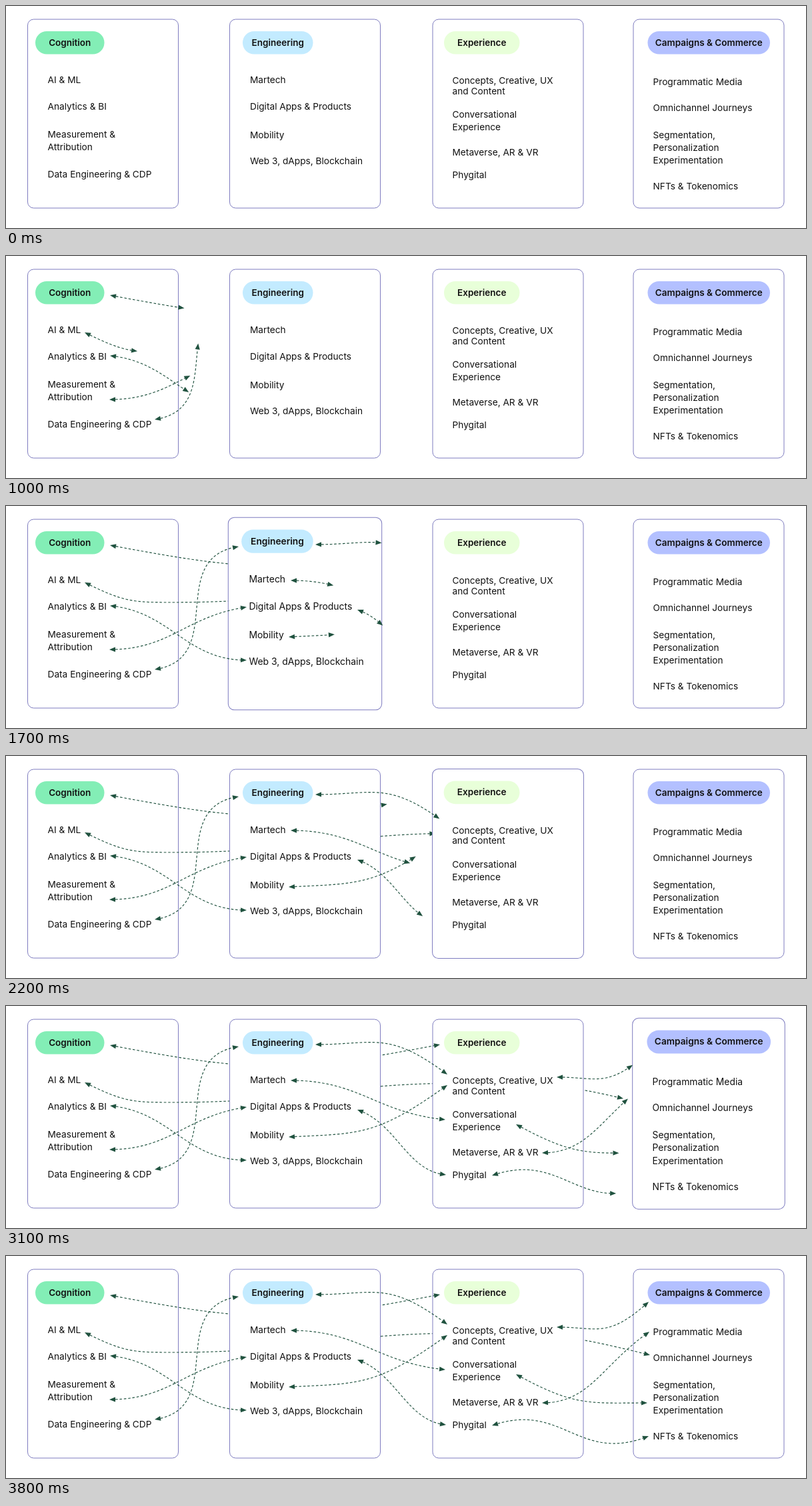
An HTML page with a canvas for the animation above (8000 ms loop, 1200 by 334 pixels).

```html
<!DOCTYPE html>
<html lang="en">
<head>
<meta charset="utf-8">
<title>Connected capabilities</title>
<style>
  html, body { margin: 0; width: 100%; height: 100%; overflow: hidden; background: #fff; }
  canvas { display: block; width: 1200px; height: 334px; }
</style>
</head>
<body>
<canvas id="stage"></canvas>
<script>
const W = 1200, H = 334, LOOP = 8000, STEP = 100;
const CARD = { y: 20, w: 226, h: 284, r: 9 };
const SWELL = 0.056, SWELL_TIME = 400, LINE_GAP = 19.3;
const GREEN = '#20523f', BORDER = '#7f7dc0', INK = '#111';
const FONT = 'Inter, "Open Sans", sans-serif';
const canvas = document.getElementById('stage');
const ctx = canvas.getContext('2d');
const ratio = window.devicePixelRatio || 1;
canvas.width = W * ratio;
canvas.height = H * ratio;

const clamp = (v, lo, hi) => Math.max(lo, Math.min(hi, v));
const mix = (a, b, u) => a + (b - a) * u;
const ease = u => (1 - Math.cos(Math.PI * clamp(u, 0, 1))) / 2;

// Each row: baseline, then one or more lines of text
const cards = [
  {
    x: 32.5, textX: 62.5, peak: 500,
    title: 'Cognition', pillX: 44, pillW: 103.5, color: '#83eeb6',
    rows: [[116, 'AI & ML'], [156, 'Analytics & BI'], [198, 'Measurement &', 'Attribution'],
           [257.5, 'Data Engineering & CDP']]
  },
  {
    x: 335.5, textX: 366, peak: 1460,
    title: 'Engineering', pillX: 355, pillW: 105.5, color: '#c3ebff',
    rows: [[116, 'Martech'], [156, 'Digital Apps & Products'], [198.5, 'Mobility'],
           [237.5, 'Web 3, dApps, Blockchain']]
  },
  {
    x: 640, textX: 669.5, peak: 2530,
    title: 'Experience', pillX: 657, pillW: 113.5, color: '#e8ffd9',
    rows: [[117, 'Concepts, Creative, UX'], [132.5, 'and Content'],
           [167.5, 'Conversational', 'Experience'], [225, 'Metaverse, AR & VR'], [258.5, 'Phygital']]
  },
  {
    x: 941, textX: 970.5, peak: 3380,
    title: 'Campaigns & Commerce', pillX: 962.5, pillW: 183.5, color: '#b3c0ff',
    rows: [[119, 'Programmatic Media'], [158, 'Omnichannel Journeys'],
           [198.5, 'Segmentation,', 'Personalization', 'Experimentation'], [275.5, 'NFTs & Tokenomics']]
  }
];

// Polyline with running length through knots [x, y, slope]
function curve(knots) {
  const out = [[knots[0][0], knots[0][1], 0]];
  for (let i = 1; i < knots.length; i++) {
    const [x0, y0, m0] = knots[i - 1], [x1, y1, m1] = knots[i];
    // Steep spans get longer handles
    const k = Math.max(0.45 * (x1 - x0), 0.6 * Math.abs(y1 - y0));
    const bezier = (a, b, c, d, u) => {
      const v = 1 - u;
      return a * v * v * v + 3 * b * u * v * v + 3 * c * u * u * v + d * u * u * u;
    };
    for (let s = 1; s <= 80; s++) {
      const x = bezier(x0, x0 + k, x1 - k, x1, s / 80);
      const y = bezier(y0, y0 + m0 * k, y1 - m1 * k, y1, s / 80);
      const last = out[out.length - 1];
      out.push([x, y, last[2] + Math.hypot(x - last[0], y - last[1])]);
    }
  }
  return out;
}

function pointAt(line, len) {
  let i = 1;
  while (i < line.length - 1 && line[i][2] < len) i++;
  const a = line[i - 1], b = line[i], u = (len - a[2]) / (b[2] - a[2]);
  return [mix(a[0], b[0], u), mix(a[1], b[1], u)];
}

const link = (start, time, ...knots) => ({ start, time, line: curve(knots) });
const wave = (start, time, ...spans) => spans.map(knots => link(start, time, ...knots));

const cognitionLink = link(100, 2850, [156, 59, 0.19], [651, 58, -0.19]);
const aiLink = link(350, 3200, [118, 115, 0.5], [250, 145, 0], [690, 116, 0], [966, 149, 0.25]);
const links = [
  ...wave(240, 1365,
    [[156, 150, 0.1], [361, 232, 0]],
    [[155, 216, 0], [361, 152, -0.15]],
    [[223, 246, -0.15], [349, 61, -0.15]]),
  link(1004, 1440, [464, 58, 0], [662, 103, 0.75]),
  ...wave(1190, 1470,
    [[427, 112, 0], [659, 171, 0.1]],
    [[424, 197, -0.05], [662, 119, -0.72]],
    [[527, 156, 0.35], [660, 254, 0.1]]),
  ...wave(2100, 1430,
    [[826, 107, 0], [964, 69, -0.9]],
    [[765, 178, 0.55], [962, 221, 0]],
    [[804, 221, 0], [965, 114, -0.7]],
    [[729, 255, -0.35], [964, 271, -0.4]])
];

function head(tip, back, size) {
  ctx.save();
  ctx.translate(...tip);
  ctx.rotate(Math.atan2(tip[1] - back[1], tip[0] - back[0]));
  ctx.beginPath();
  ctx.moveTo(0, 0);
  ctx.lineTo(-size, -size * 0.4);
  ctx.lineTo(-size, size * 0.4);
  ctx.fill();
  ctx.restore();
}

function drawLink({ start, time, line }, t) {
  const len = ease((t - start) / time) * line[line.length - 1][2];
  if (len < 4) return;
  const size = Math.min(9, len * 0.4);
  const from = pointAt(line, size), to = pointAt(line, len - size);
  ctx.strokeStyle = ctx.fillStyle = GREEN;
  ctx.lineWidth = 1.15;
  ctx.setLineDash([3.6, 2.8]);
  ctx.beginPath();
  ctx.moveTo(...from);
  for (const [x, y, d] of line) if (d > size && d < len - size) ctx.lineTo(x, y);
  ctx.lineTo(...to);
  ctx.stroke();
  ctx.setLineDash([]);
  head(pointAt(line, 0), from, size);
  head(pointAt(line, len), to, size);
}

function box(x, y, w, h, r, fill) {
  ctx.beginPath();
  ctx.roundRect(x, y, w, h, r);
  ctx.fillStyle = fill;
  ctx.fill();
}

function drawCard(card, t) {
  const phase = clamp((t - card.peak) / SWELL_TIME, -1, 1);
  const scale = 1 + SWELL * Math.cos(phase * Math.PI / 2) ** 2;
  const cx = card.x + CARD.w / 2, cy = CARD.y + CARD.h / 2;
  ctx.save();
  ctx.translate(cx, cy);
  ctx.scale(scale, scale);
  ctx.translate(-cx, -cy);

  box(card.x, CARD.y, CARD.w, CARD.h, CARD.r, '#fff');
  ctx.strokeStyle = BORDER;
  ctx.lineWidth = 1;
  ctx.stroke();
  box(card.pillX, 38, card.pillW, 34.5, 17.2, card.color);

  ctx.fillStyle = INK;
  ctx.textAlign = 'center';
  ctx.font = '600 13.5px ' + FONT;
  ctx.fillText(card.title, card.pillX + card.pillW / 2, 59.5);
  ctx.textAlign = 'left';
  ctx.font = '400 13.7px ' + FONT;
  for (const [y, ...lines] of card.rows) {
    lines.forEach((text, i) => ctx.fillText(text, card.textX, y + i * LINE_GAP));
  }
  ctx.restore();
}

function draw(t) {
  ctx.setTransform(ratio, 0, 0, ratio, 0, 0);
  ctx.fillStyle = '#fff';
  ctx.fillRect(0, 0, W, H);
  drawCard(cards[0], t);
  drawCard(cards[3], t);
  // The two long links run behind the middle cards
  drawLink(aiLink, t);
  drawCard(cards[2], t);
  drawLink(cognitionLink, t);
  drawCard(cards[1], t);
  links.forEach(item => drawLink(item, t));
}

const begin = performance.now();
function tick() {
  const t = (performance.now() - begin) % LOOP;
  draw(Math.floor(t / STEP) * STEP);
  requestAnimationFrame(tick);
}
tick();
</script>
</body>
</html>
```
